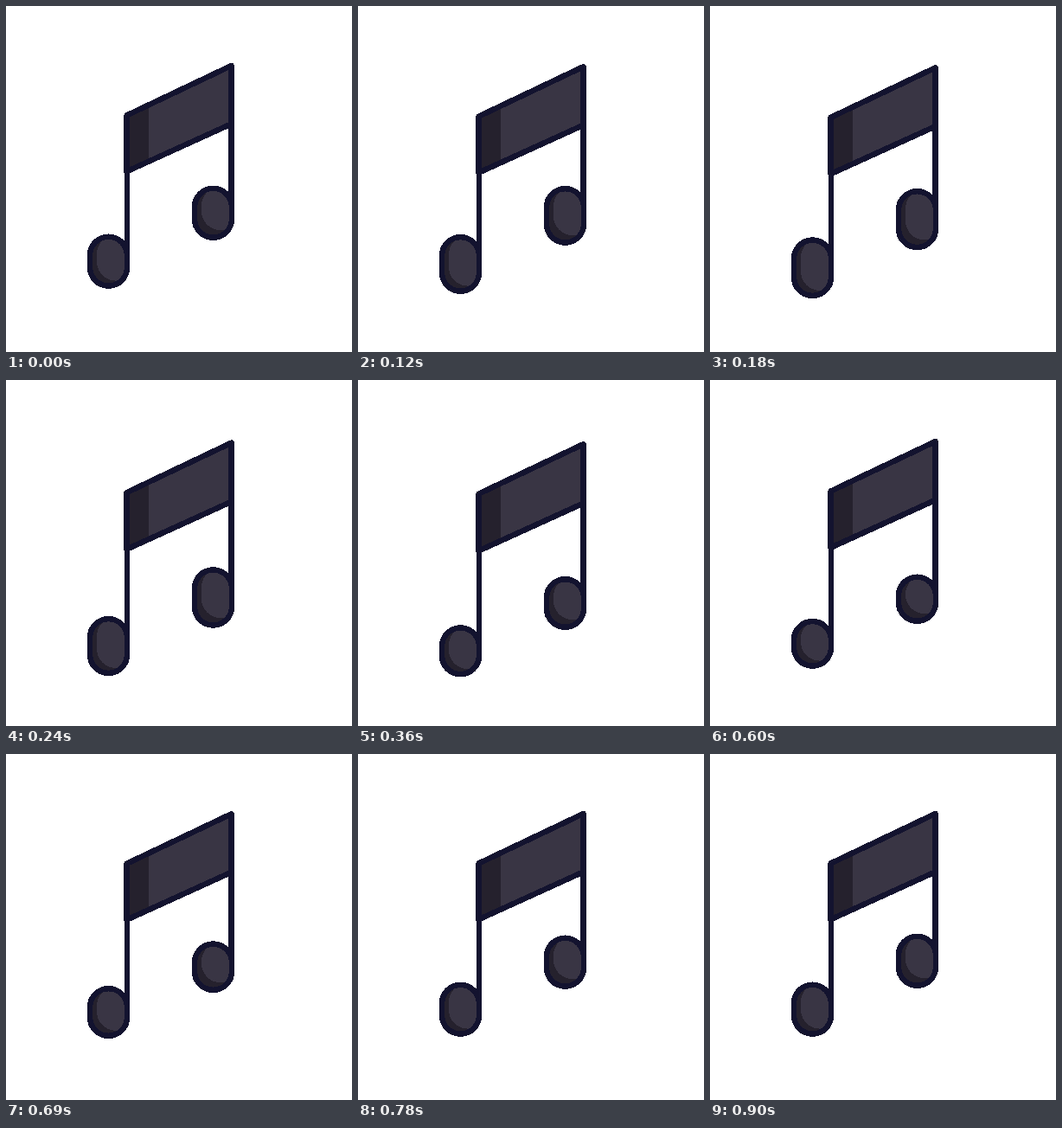
These frames come from a looping animation (400x400 px, 0.96 s). An HTML page:

```html
<!DOCTYPE html>
<html lang="en">
<head>
<meta charset="utf-8">
<title>Bouncing note</title>
<style>
  html, body { margin: 0; width: 100%; height: 100%; overflow: hidden; background: #fff; }
  svg { display: block; width: 100vw; height: 100vh; shape-rendering: crispEdges; }
  .line { fill: none; stroke: #13132f; stroke-width: 6.5; stroke-linejoin: round; stroke-linecap: round; }
  .dark { fill: #25212d; }
  .light { fill: #393544; }
</style>
</head>
<body>
<svg viewBox="0 0 400 400">
  <defs>
    <clipPath id="clipL"><rect x="97" width="43" rx="21.5"/></clipPath>
    <clipPath id="clipR"><rect x="218" width="43" rx="21.5"/></clipPath>
  </defs>
  <path id="stems" class="line"/>
  <path id="flag" class="light"/>
  <path id="shade" class="dark"/>
  <path id="edge" class="line"/>
  <g id="headL">
    <rect class="dark" x="97" width="43" rx="21.5"/>
    <g clip-path="url(#clipL)"><rect class="light" x="105" width="44" rx="22"/></g>
    <rect class="line" x="97" width="43" rx="21.5"/>
  </g>
  <g id="headR">
    <rect class="dark" x="218" width="43" rx="21.5"/>
    <g clip-path="url(#clipR)"><rect class="light" x="226" width="44" rx="22"/></g>
    <rect class="line" x="218" width="43" rx="21.5"/>
  </g>
</svg>
<script>
const LOOP = 960, STEP = 30, LAST = 900;
const $ = id => document.getElementById(id);
const mix = (a, b, u) => a + (b - a) * u;

// Sine ease from 0 at time a to 1 at time b
function ease(t, a, b) {
  const u = Math.min(1, Math.max(0, (t - a) / (b - a)));
  return (1 - Math.cos(Math.PI * u)) / 2;
}

// Down over a..b, hold, back up over c..d
const dip = (t, a, b, c, d) => ease(t, a, b) - ease(t, c, d);

function span(rect, top, bottom) {
  rect.setAttribute('y', top);
  rect.setAttribute('height', bottom - top);
}

function setHead(side, top, bottom, shade) {
  const [base, light, rim] = $('head' + side).querySelectorAll('rect');
  const clip = $('clip' + side).firstElementChild;
  for (const r of [base, rim, clip]) span(r, top + 3, bottom - 3);
  span(light, top + 1, bottom - shade);
}

// Part of the flag from its left edge to x
function flagPath(x, drop) {
  const left = 139.5, u = (x - left) / 121;
  const top = 126.5 + drop, bottom = 191.3 + drop * 1.2;
  return `M${left} ${top}L${x} ${mix(top, 69 + drop, u)}`
    + `V${mix(bottom, 136.3 + drop * 1.2, u)}L${left} ${bottom}Z`;
}

function draw() {
  const t = Math.min(LAST, Math.floor(performance.now() % LOOP / STEP) * STEP);
  const drop = 5.2 * dip(t, 0, 380, 420, 740);
  const topL = 263.7 + 21 * dip(t, 90, 410, 440, 800);
  const bottomL = 326.6 + 16.5 * dip(t, 0, 290, 370, 790);
  const topR = 207.8 + 22.2 * dip(t, 90, 440, 480, 850);
  const bottomR = 270.7 + 18 * dip(t, 0, 310, 420, 840);

  const whole = flagPath(260.5, drop);
  $('flag').setAttribute('d', whole);
  $('edge').setAttribute('d', whole);
  $('shade').setAttribute('d', flagPath(165, drop));
  $('stems').setAttribute('d',
    `M140 ${150 + drop}V${bottomL - 25}M260.5 ${100 + drop}V${bottomR - 25}`);
  setHead('L', topL, bottomL, 9);
  setHead('R', topR, bottomR, 11.5);
  requestAnimationFrame(draw);
}
draw();
</script>
</body>
</html>
```
